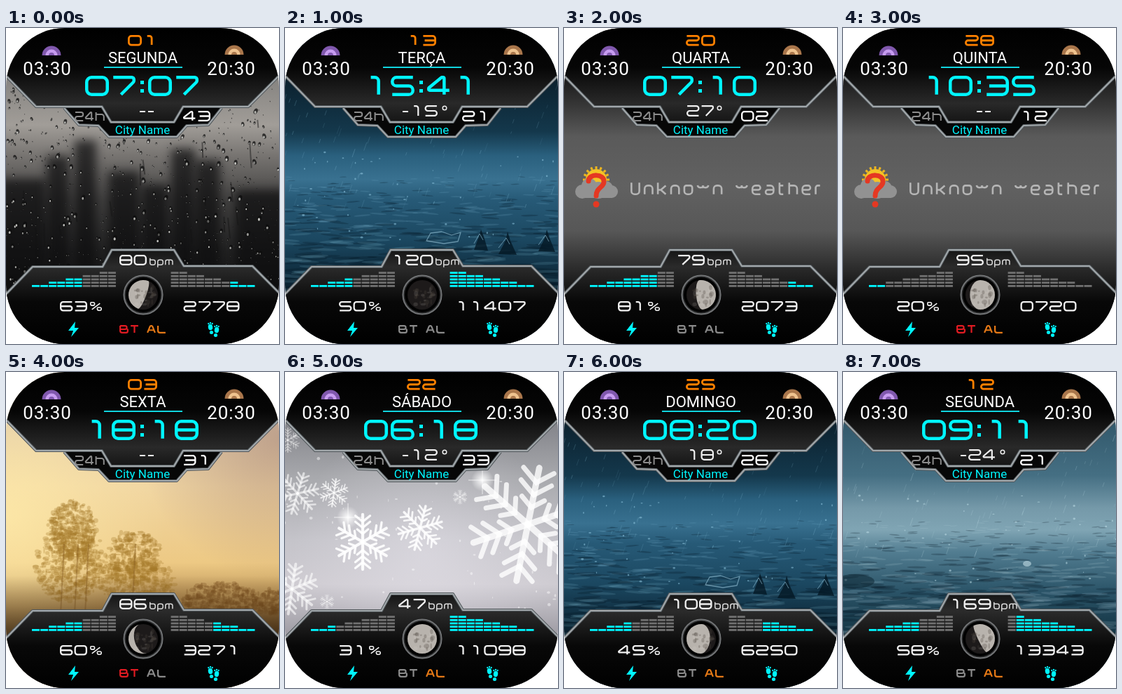
Recreate the animation shown at these times as an HTML page with a canvas. Size 390 px wide and 450 px high, loop 8 s.

```html
<!DOCTYPE html>
<html lang="pt">
<head>
<meta charset="utf-8">
<title>Watch face</title>
<style>
html, body { margin: 0; width: 100%; height: 100%; overflow: hidden; background: #fff; }
canvas { display: block; width: 390px; height: 450px; }
</style>
</head>
<body>
<canvas id="face" width="390" height="450" aria-label="Watch face with time, weather and activity"></canvas>
<script>
const W = 390, H = 450, TAU = Math.PI * 2;
const CYAN = '#00f6ff', ORANGE = '#ff8000', RED = '#e01b22', GRAY = '#8b8b8b', PALE = '#f0f0f0';
const canvas = document.getElementById('face');
let ctx = canvas.getContext('2d');

// Strokes as xy pairs in base 16 on an 8 by 8 grid; "|" lifts the pen.
const GLYPHS = {
  0: '40 80 88 08 00 40', 1: '20 50 58', 2: '00 80 84 04 08 88', 3: '00 80 88 08|14 84',
  4: '68 60 50 05 06 86', 5: '80 00 04 84 88 08', 6: '80 00 08 88 84 04', 7: '00 80 82 38',
  8: '40 80 88 08 00 40|04 84', 9: '84 04 00 80 88 08',
  '%': '10 30 33 03 00 10|65 85 88 58 55 65|71 17',
  B: '00 70 74 04|74 84 88 08 00', T: '00 80|40 48', A: '08 30 50 88|15 75', L: '00 08 88',
  U: '00 08 88 80', n: '08 02 82 88', k: '00 08|05 35 82|35 88', o: '42 82 88 08 02 42',
  w: '02 28 43 68 82', e: '05 85 82 02 08 88', a: '12 82 88 08 05 85', t: '10 18 78|02 72',
  h: '00 08|02 82 88', r: '08 02 72', b: '00 08 88 82 02', p: '0b 02 82 88 08',
  m: '08 02 82 88|42 48', ' ': ''
};
const WIDTHS = { w: 1.3, m: 1.3, t: .7, r: .7, ' ': .6 };

// Each state lasts one second.
const STATES = [
  { date: '01', day: 'SEGUNDA', time: '0707', temp: null, sec: '43', bpm: '80', bat: 63, steps: '2778', bars: 3, bt: 1, al: 1, moon: [.2, 3.5], scene: 'glass' },
  { date: '13', day: 'TERÇA', time: '1541', temp: -15, sec: '21', bpm: '120', bat: 50, steps: '11407', bars: 10, bt: 0, al: 0, moon: [-1, 0], scene: 'night' },
  { date: '20', day: 'QUARTA', time: '0710', temp: 27, sec: '02', bpm: '79', bat: 81, steps: '2073', bars: 3, bt: 0, al: 0, moon: [.35, -.1], scene: 'unknown' },
  { date: '28', day: 'QUINTA', time: '1035', temp: null, sec: '12', bpm: '95', bat: 20, steps: '0720', bars: 0, bt: 1, al: 1, moon: [.7, 0], scene: 'unknown' },
  { date: '03', day: 'SEXTA', time: '1818', temp: null, sec: '31', bpm: '86', bat: 60, steps: '3271', bars: 5, bt: 1, al: 0, moon: [-.6, 2.9], scene: 'mist' },
  { date: '22', day: 'SÁBADO', time: '0618', temp: -12, sec: '33', bpm: '47', bat: 31, steps: '11098', bars: 10, bt: 0, al: 1, moon: [1, 0], scene: 'snow' },
  { date: '25', day: 'DOMINGO', time: '0820', temp: 18, sec: '26', bpm: '108', bat: 45, steps: '6250', bars: 6, bt: 0, al: 1, moon: [.6, 3.2], scene: 'night' },
  { date: '12', day: 'SEGUNDA', time: '0911', temp: -24, sec: '21', bpm: '169', bat: 58, steps: '13343', bars: 9, bt: 0, al: 1, moon: [.15, -.45], scene: 'rain' }
];

function seeded(seed) {
  return () => (seed = (seed * 16807) % 2147483647) / 2147483647;
}

function vertical(y0, y1, ...stops) {
  const g = ctx.createLinearGradient(0, y0, 0, y1);
  stops.forEach(([at, color]) => g.addColorStop(at, color));
  return g;
}

function glow(x, y, r, color, clear) {
  const g = ctx.createRadialGradient(x, y, 0, x, y, r);
  g.addColorStop(0, color);
  g.addColorStop(1, clear);
  ctx.fillStyle = g;
  ctx.fillRect(x - r, y - r, r * 2, r * 2);
}

function fillAll(style) {
  ctx.fillStyle = style;
  ctx.fillRect(0, 0, W, H);
}

function ellipse(x, y, rx, ry = rx, color = ctx.fillStyle, turn = 0) {
  ctx.fillStyle = color;
  ctx.beginPath();
  ctx.ellipse(x, y, rx, ry, turn, 0, TAU);
  ctx.fill();
}

function line(points, color, width, close) {
  ctx.beginPath();
  points.forEach(([x, y]) => ctx.lineTo(x, y));
  if (close) ctx.closePath();
  ctx.strokeStyle = color;
  ctx.lineWidth = width;
  ctx.stroke();
}

function polygon(points, color) {
  ctx.beginPath();
  points.forEach(([x, y]) => ctx.lineTo(x, y));
  ctx.closePath();
  ctx.fillStyle = color;
  ctx.fill();
}

function roundedStroke(points, radius) {
  const dist = (a, b) => Math.hypot(a[0] - b[0], a[1] - b[1]);
  ctx.beginPath();
  ctx.moveTo(...points[0]);
  for (let i = 1; i < points.length - 1; i++) {
    const [a, b, c] = points.slice(i - 1, i + 2);
    ctx.arcTo(...b, ...c, Math.min(radius, dist(a, b) / 2, dist(b, c) / 2));
  }
  ctx.lineTo(...points[points.length - 1]);
  ctx.stroke();
}

function wide(text, x, y, w, h, gap, weight, color) {
  ctx.strokeStyle = color;
  ctx.lineWidth = weight;
  for (const ch of text) {
    const cw = w * (WIDTHS[ch] || 1);
    const place = pair => [
      x + weight / 2 + parseInt(pair[0], 16) / 8 * (cw - weight),
      y + weight / 2 + parseInt(pair[1], 16) / 8 * (h - weight)
    ];
    for (const part of GLYPHS[ch].split('|')) {
      if (part) roundedStroke(part.split(' ').map(place), h * .24);
    }
    x += cw + gap;
  }
}

function label(text, x, y, size, color, spacing = 0) {
  ctx.font = `${size}px Roboto, sans-serif`;
  ctx.letterSpacing = spacing + 'px';
  ctx.textAlign = 'center';
  ctx.fillStyle = color;
  ctx.fillText(text, x, y);
}

function flake(x, y, r, alpha, turn = 0) {
  ctx.save();
  ctx.translate(x, y);
  ctx.rotate(turn);
  ctx.globalAlpha = alpha;
  ctx.lineCap = 'round';
  for (let arm = 0; arm < 6; arm++) {
    line([[0, 0], [0, -r]], '#fff', r * .11);
    for (const at of [.3, .52, .74]) {
      const s = r * (at < .4 ? .2 : .27);
      line([[-s, -r * at - s * .8], [0, -r * at], [s, -r * at - s * .8]], '#fff', r * .085);
    }
    ctx.rotate(TAU / 6);
  }
  ctx.restore();
}

function foliage(rand, x, y, rx, ry, count, color) {
  for (let i = 0; i < count; i++) {
    const a = rand() * TAU, d = Math.sqrt(rand()) * (.85 + rand() * .2);
    ellipse(x + Math.cos(a) * rx * d, y + Math.sin(a) * ry * d, 1 + rand() * 4, 1 + rand() * 3, color);
  }
}

function rainScene(stops, light, seed) {
  const rand = seeded(seed);
  fillAll(vertical(70, 380, ...stops));
  for (let i = 0; i < 420; i++) {
    const depth = rand(), y = 212 + depth * 165, x = rand() * W;
    const half = 5 + depth * 22, tall = .6 + depth * 2;
    ellipse(x, y, half, tall, rand() < .5 ? `rgba(${light},.14)` : 'rgba(2,18,29,.24)', (rand() - .5) * .2);
  }
  for (let i = 0; i < 110; i++) {
    const x = rand() * W, y = 75 + rand() * 180, n = 3 + rand() * 9;
    line([[x, y], [x - n * .35, y + n]], `rgba(${light},${.1 + rand() * .25})`, .8);
  }
  for (let i = 0; i < 45; i++) {
    ellipse(rand() * W, 175 + rand() * 130, .6 + rand() * 1.4, .6 + rand(), `rgba(${light},.55)`);
  }
}

const SCENES = {
  glass() {
    const rand = seeded(71);
    fillAll(vertical(70, 380, [0, '#858380'], [.22, '#a19d98'], [.36, '#777471'], [.56, '#444342'], [.8, '#222'], [1, '#101010']));
    ctx.filter = 'blur(7px)';
    ctx.fillStyle = 'rgba(13,13,14,.72)';
    [[-8, 215, 65], [58, 182, 32], [98, 160, 31], [146, 204, 45], [194, 223, 38], [236, 172, 34], [270, 188, 36], [327, 230, 75]]
      .forEach(([x, y, w]) => ctx.fillRect(x, y, w, 220));
    ctx.filter = 'none';
    for (let i = 0; i < 850; i++) {
      const x = rand() * W, y = 85 + rand() * 290, r = .5 + rand() ** 3 * 2.4;
      ellipse(x, y, r, r * 1.5, 'rgba(12,12,12,.75)', rand() - .5);
      ellipse(x - r * .2, y + r * .55, r * .55, r * .75, `rgba(235,235,230,${.3 + rand() * .55})`);
    }
    for (let i = 0; i < 25; i++) {
      const x = rand() * W, y = 110 + rand() * 210;
      line([[x, y], [x + rand() * 3, y + 10 + rand() * 25]], 'rgba(20,20,20,.45)', 2);
    }
  },
  night() {
    rainScene([[0, '#0b202d'], [.25, '#14384c'], [.36, '#2a607e'], [.47, '#397190'], [.56, '#275a77'], [.75, '#1b4760'], [1, '#071b28']], '145,201,225', 37);
    ctx.lineJoin = 'round';
    line([[202, 303], [208, 292], [224, 290], [238, 295], [251, 291], [247, 304], [227, 307], [202, 303]], 'rgba(165,210,230,.55)', 1.3);
    for (const [x, y, r] of [[280, 297, 10], [318, 303, 13], [374, 299, 12]]) {
      polygon([[x - r, y + 19], [x - 3, y], [x, y - r], [x + 4, y], [x + r, y + 20]], 'rgba(4,24,36,.8)');
      line([[x - r, y + 10], [x - 2, y - 4], [x + 3, y + 5]], 'rgba(165,210,230,.55)', 1);
    }
  },
  rain() {
    rainScene([[0, '#31586b'], [.25, '#456f83'], [.4, '#7599a9'], [.5, '#80a5b4'], [.6, '#527d91'], [.78, '#2b5468'], [1, '#10303f']], '190,220,230', 91);
    ellipse(263, 273, 6, 4, 'rgba(210,234,241,.55)');
    ellipse(17, 298, 28, 10, 'rgba(10,35,47,.5)');
  },
  unknown() {
    fillAll(vertical(65, 385, [0, '#161616'], [.15, '#393939'], [.28, '#5a5a5a'], [.5, '#616161'], [.7, '#575757'], [.85, '#303030'], [1, '#0a0a0a']));
    for (let i = 0; i < 16; i++) {
      const a = i / 16 * TAU, c = Math.cos(a), s = Math.sin(a);
      line([[46 + c * 15, 216 + s * 15], [46 + c * 19, 216 + s * 19]], '#edb51f', 3);
    }
    ellipse(46, 216, 15, 15, '#f3c326');
    for (const [x, y, r] of [[26, 233, 10], [36, 225, 11], [49, 231, 12], [60, 228, 10], [68, 233, 9]]) ellipse(x, y, r, r, '#929292');
    ctx.fillRect(25, 231, 44, 11);
    ctx.lineCap = 'round';
    ctx.beginPath();
    ctx.moveTo(35, 218);
    ctx.bezierCurveTo(35, 207, 58, 207, 57, 219);
    ctx.bezierCurveTo(57, 227, 46, 227, 46, 239);
    ctx.strokeStyle = '#e53822';
    ctx.lineWidth = 7;
    ctx.stroke();
    ellipse(46, 251, 4.5, 4.5, '#e53822');
    ctx.lineCap = 'butt';
    wide('Unknown weather', 95, 219, 13.9, 19, 5, 2.6, '#b5b5b5');
  },
  mist() {
    const rand = seeded(53);
    fillAll(vertical(70, 380, [0, '#dfc9aa'], [.3, '#f0d5a2'], [.65, '#edc984'], [.85, '#b18a50'], [1, '#594020']));
    glow(0, 205, 230, 'rgba(255,235,170,.8)', 'rgba(255,235,170,0)');
    glow(390, 95, 200, 'rgba(155,120,112,.5)', 'rgba(155,120,112,0)');
    const tree = 'rgba(166,121,42,.3)';
    foliage(rand, 95, 225, 35, 46, 420, tree);
    foliage(rand, 94, 275, 52, 55, 560, tree);
    foliage(rand, 182, 262, 40, 37, 330, tree);
    foliage(rand, 186, 300, 54, 38, 430, tree);
    foliage(rand, 307, 324, 55, 26, 330, 'rgba(130,87,37,.3)');
    foliage(rand, 378, 326, 35, 18, 150, 'rgba(130,87,37,.3)');
    for (const x of [78, 98, 113, 180]) line([[x, 345], [x + 5, 245]], 'rgba(125,84,28,.35)', 2);
    fillAll(vertical(290, 380, [0, 'rgba(75,47,16,0)'], [1, 'rgba(55,35,14,.75)']));
  },
  snow() {
    const rand = seeded(19);
    fillAll(vertical(70, 380, [0, '#828389'], [.25, '#a7a8ac'], [.55, '#c5c4ca'], [.75, '#cfccd2'], [1, '#9a98a0']));
    glow(200, 260, 190, 'rgba(235,232,240,.45)', 'rgba(235,232,240,0)');
    for (let i = 0; i < 70; i++) ellipse(rand() * W, 80 + rand() * 270, .5 + rand() * 2, .5 + rand() * 2, 'rgba(255,255,255,.45)');
    flake(347, 217, 82, .8, .2);
    flake(111, 242, 39, .9);
    flake(193, 222, 32, .85, .25);
    flake(70, 172, 20, .7, .15);
    flake(18, 173, 30, .6, .3);
    flake(10, 309, 36, .6, .15);
    flake(4, 97, 17, .4);
    flake(250, 178, 10, .55);
    flake(60, 327, 10, .5);
    for (const [x, y] of [[90, 207], [282, 154]]) {
      glow(x, y, 16, 'rgba(255,255,255,.95)', 'rgba(255,255,255,0)');
      line([[x - 20, y], [x + 20, y]], 'rgba(255,255,255,.7)', 1);
      line([[x, y - 20], [x, y + 20]], 'rgba(255,255,255,.7)', 1);
    }
  }
};

function paintScene(draw) {
  const layer = document.createElement('canvas'), main = ctx;
  layer.width = W;
  layer.height = H;
  ctx = layer.getContext('2d');
  draw();
  ctx = main;
  return layer;
}

function edge(points) {
  ctx.lineJoin = 'round';
  line(points, '#50565a', 4);
  line(points, '#a2a8ab', 2);
}

function halfSun(x, y, outer, inner) {
  const half = (r, color) => {
    ctx.beginPath();
    ctx.arc(x, y, r, Math.PI, TAU);
    ctx.fillStyle = color;
    ctx.fill();
  };
  half(13.5, outer);
  half(8.5, inner);
  half(4, outer);
}

function panels() {
  const lower = [[83, 114], [104, 138], [132, 139], [147, 155], [244, 155], [258, 139], [289, 138], [308, 114]];
  const top = [[-2, 66], [43, 112], [137, 112], [150, 134], [240, 134], [253, 112], [346, 112], [392, 66]];
  const bottom = [[-2, 381], [38, 340], [138, 340], [151, 316], [240, 316], [254, 339], [352, 339], [392, 379]];
  polygon(lower, '#070707');
  edge(lower);
  polygon([...top, [392, -2], [-2, -2]], vertical(0, 134, [0, '#000'], [.42, '#060606'], [.8, '#292929'], [1, '#151515']));
  edge(top);
  polygon([...bottom, [392, 452], [-2, 452]], vertical(316, 450, [0, '#151515'], [.18, '#2b2b2b'], [.55, '#080808'], [1, '#000']));
  edge(bottom);
  line([[140, 56], [252, 56]], '#10d5df', 2.2);
}

function bars(count, left) {
  for (let col = 0; col < 10; col++) {
    const x = left ? 37 + col * 12.1 : 344.5 - col * 12.1;
    ctx.fillStyle = col < count ? CYAN : '#707070';
    for (let row = 0; row <= col >> 1; row++) ctx.fillRect(x, 366 - row * 4.7, 11, 2.8);
  }
}

function moon([lit, turn]) {
  const x = 196, y = 380, r = 21;
  ellipse(x, y, 28.5, 28.5, '#292a2b');
  ellipse(x, y, 25, 25, '#020202');
  ctx.strokeStyle = '#717375';
  ctx.lineWidth = 2;
  ctx.beginPath();
  ctx.arc(x, y, 27.5, 0, TAU);
  ctx.stroke();
  ellipse(x, y, r, r, '#1d1a1a');
  ctx.save();
  ctx.translate(x, y);
  ctx.rotate(turn);
  ctx.beginPath();
  ctx.arc(0, 0, r, -TAU / 4, TAU / 4);
  ctx.ellipse(0, 0, Math.abs(lit) * r, r, 0, TAU / 4, -TAU / 4, lit < 0);
  ctx.fillStyle = '#b8b3ad';
  if (lit > -1) ctx.fill();
  ctx.restore();
  const rand = seeded(29);
  for (let i = 0; i < 26; i++) {
    const a = rand() * TAU, d = Math.sqrt(rand()) * 17;
    ellipse(x + Math.cos(a) * d, y + Math.sin(a) * d, 1 + rand() * 3, 1 + rand() * 3, i % 3 ? 'rgba(72,64,60,.28)' : 'rgba(220,215,207,.13)');
  }
}

function temperature(value) {
  const dash = (x, w) => line([[x, 119], [x + w, 119]], PALE, 1.8);
  if (value === null) {
    dash(191, 8);
    dash(203, 8);
    return;
  }
  const cold = value < 0;
  if (cold) dash(168, 8);
  wide(String(Math.abs(value)), cold ? 179 : 175, 110, 18.5, 16, 2, 2.2, PALE);
  ctx.lineWidth = 1.5;
  ctx.beginPath();
  ctx.arc(cold ? 228 : 222, 114, 2.8, 0, TAU);
  ctx.stroke();
}

function icons() {
  halfSun(65, 39, '#8058ad', '#c79cf0');
  halfSun(326, 38, '#a9764b', '#efc38f');
  polygon([[99, 418], [89, 431], [96, 431], [93, 440], [104, 427], [98, 427]], CYAN);
  for (const [x, y, lean] of [[292, 426, -.15], [301, 430, .15]]) {
    ellipse(x, y, 3.2, 4.2, CYAN, lean);
    ellipse(x - lean * 10, y + 7.5, 2.6, 2.5);
    for (const i of [-1, 0, 1]) ellipse(x + i * 2.7, y - 6 + Math.abs(i), 1.1, 1.3);
  }
}

const layers = {};
for (const name in SCENES) layers[name] = paintScene(SCENES[name]);

function draw(s) {
  fillAll('#fff');
  ctx.save();
  ctx.beginPath();
  ctx.roundRect(0, 0, W, H, 84);
  ctx.clip();
  ctx.drawImage(layers[s.scene], 0, 0);
  panels();
  icons();

  wide(s.date, 174, 10, 20, 15.5, 2, 2.8, ORANGE);
  label(s.day, 195.5, 50, 22, '#fff');
  label('03:30', 59, 67, 26, '#fff', 1);
  label('20:30', 322, 67, 26, '#fff', 1);
  wide(s.time.slice(0, 2), 113, 68, 34, 29, 4, 4.5, CYAN);
  wide(s.time.slice(2), 203, 68, 34, 29, 4, 4.5, CYAN);
  ctx.fillStyle = CYAN;
  ctx.fillRect(192, 75, 5, 5);
  ctx.fillRect(192, 87, 5, 5);

  temperature(s.temp);
  wide('24h', 98, 119, 13.2, 14, 1.6, 2, GRAY);
  wide(s.sec, 253, 118, 18.5, 15, 2, 2.3, '#fff');
  label('City Name', 195, 151, 17, CYAN);

  const shift = (s.bpm.length - 2) * 10;
  wide(s.bpm, 162 - shift, 323, 18.5, 15, 2, 2.3, PALE);
  wide('bpm', 205 + shift, 327, 9, 11, 2, 1.5, '#d8d8d8');
  bars(Math.round(s.bat / 10), true);
  bars(s.bars, false);
  moon(s.moon);

  wide(String(s.bat), 77, 389, 18.5, 14.5, 2, 2.3, PALE);
  wide('%', 120, 390, 17, 13, 0, 1.6, PALE);
  wide(s.steps, 294.5 - s.steps.length * 10.25, 389, 18.5, 14.5, 2, 2.3, PALE);
  wide('BT', 162, 423, 13, 12, 2, 2.2, s.bt ? RED : GRAY);
  wide('AL', 201, 423, 13, 12, 2, 2.2, s.al ? '#e57916' : GRAY);
  ctx.restore();
}

let shown = -1;
const start = performance.now();
function tick(now) {
  const index = Math.floor(Math.max(0, now - start) / 1000) % STATES.length;
  if (index !== shown) draw(STATES[shown = index]);
  requestAnimationFrame(tick);
}
tick(start);
</script>
</body>
</html>
```
